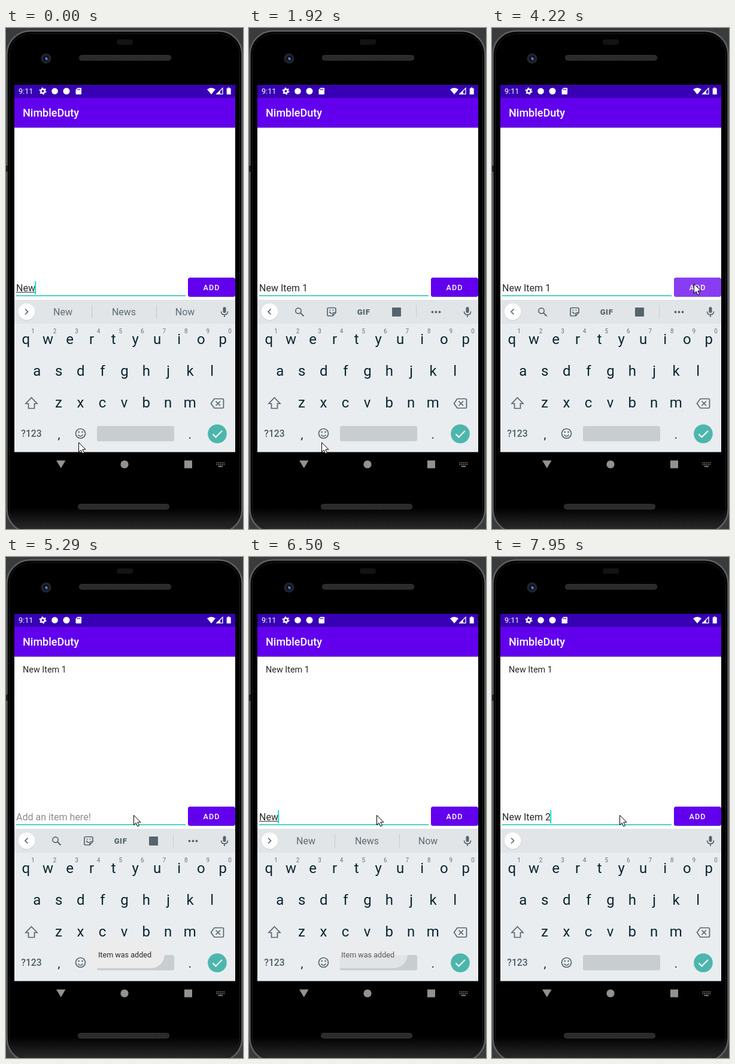
An HTML page for the animation above (8000 ms loop, 396 by 837 pixels).

```html
<!DOCTYPE html>
<html lang="en">
<head>
<meta charset="utf-8">
<title>Todo phone demo</title>
<style>
  html, body { margin: 0; width: 100%; height: 100%; overflow: hidden; background: #3a3b3d; }
  svg { display: block; font-family: Roboto, sans-serif; }
  text { white-space: pre; }
  .mid { text-anchor: middle; }
  .medium { font-weight: 500; }
  .line { fill: none; stroke: #56646c; stroke-width: 1.7; }
  .key { font-size: 24px; fill: #0b2530; }
  .digit { font-size: 10px; fill: #63727a; }
  .word { font-size: 16px; fill: #5d6b73; }
</style>
</head>
<body>
<svg width="396" height="837" viewBox="0 0 396 837">
  <defs>
    <pattern id="mesh" width="3" height="3" patternUnits="userSpaceOnUse">
      <rect width="3" height="3" fill="#202020"/>
      <path d="M0 3L3 0" stroke="#484848" stroke-width=".8"/>
    </pattern>
    <linearGradient id="body" x2="0" y2="1">
      <stop offset=".95"/><stop offset="1" stop-color="#303030"/>
    </linearGradient>
  </defs>

  <!-- phone body -->
  <rect width="396" height="837" fill="#3a3b3d"/>
  <rect x="1.500" y="5" width="393" height="838" rx="39" fill="url(#body)" stroke="#5e6061" stroke-width="2.500"/>
  <rect x="5.5" y="9.500" width="385" height="829" rx="35" fill="none" stroke="#1d1d1d"/>
  <path d="M0 230h3v10H0z" fill="#222"/>
  <rect x="185" y="19" width="27" height="9" rx="4" fill="#131313"/>
  <circle cx="67" cy="51" r="8.5" fill="#252529"/>
  <circle cx="67" cy="51" r="5.5" fill="#10152c"/>
  <circle cx="68" cy="52" r="2.3" fill="#365a9c"/>
  <circle cx="67" cy="50.500" r="1.200" fill="#9db4e0"/>
  <g fill="url(#mesh)" stroke="#343434">
    <rect x="122.5" y="45.500" width="153" height="8.500" rx="4"/>
    <rect x="120.5" y="795.5" width="152" height="8.500" rx="4"/>
  </g>

  <!-- status and title bars -->
  <rect x="14" y="95" width="369" height="21.300" fill="#3700b3"/>
  <rect x="14" y="116.300" width="369" height="50.200" fill="#6200ee"/>
  <g fill="#fff">
    <text x="21" y="110" font-size="12.6">9:11</text>
    <circle cx="61.5" cy="105.5" r="3.2" fill="none" stroke="#fff" stroke-width="2.5"/>
    <circle cx="61.5" cy="105.5" r="5.1" fill="none" stroke="#fff" stroke-width="1.8" stroke-dasharray="2.5 2.84"/>
    <circle cx="81.5" cy="105.5" r="5.3"/>
    <circle cx="101" cy="105.5" r="5.5"/>
    <path d="M119.500 100H125q1 0 1 1v9q0 1-1 1h-7.500q-1 0-1-1V103z"/>
    <path d="M119.500 101.500v2.500M121.500 101.500v2.500M123.500 101.500v2.500" stroke="#3700b3"/>
    <path d="M336 102.500q7-5 14 0L343 111z"/>
    <path d="M352 110.300L362 100.500V110.300z" fill="none" stroke="#fff" stroke-width="1.300"/>
    <path d="M351 111L358 104V111z"/>
    <path d="M370.500 99.500h3v1.200h2.200v10.300h-7V100.700h1.800z"/>
    <text class="medium" x="28" y="148" font-size="18">NimbleDuty</text>
  </g>

  <!-- app content -->
  <rect x="14" y="166.500" width="369" height="288" fill="#fff"/>
  <text id="item" x="28" y="193" font-size="14.4" fill="#282828">New Item 1</text>
  <text id="hint" x="17" y="440" font-size="16" fill="#8c8c8c">Add an item here!</text>
  <text id="field" x="17" y="440" font-size="16" fill="#282828"></text>
  <rect id="underline" y="441" height="1" fill="#333"/>
  <rect id="caret" y="423" width="1.8" height="22" fill="#03dac5"/>
  <rect x="17" y="446.500" width="283" height="1.600" fill="#1fc4b2"/>
  <rect x="304" y="418" width="79" height="32" rx="3.500" fill="#dedede"/>
  <rect id="button" x="304" y="417" width="79" height="32" rx="3.500"/>
  <text class="mid medium" x="343.500" y="438" font-size="12.600" letter-spacing="1.12" fill="#fff">ADD</text>

  <!-- keyboard -->
  <rect x="14" y="454" width="369" height="254.500" fill="#e9edf0"/>
  <rect x="14" y="454" width="369" height="40" fill="#e1e5e8"/>
  <circle cx="34.500" cy="475" r="14" fill="#cdd2d5"/>
  <circle cx="34.500" cy="474" r="13.700" fill="#fff"/>
  <path id="chevron" class="line"/>
  <g fill="#56646c">
    <rect x="362.500" y="466" width="5" height="10" rx="2.500"/>
    <path class="line" d="M359.500 473.500q0 5.500 5.500 5.500t5.500-5.500M365 479v4"/>
  </g>
  <g id="words">
    <path d="M143.500 463v22M251.500 463v22" stroke="#c3c9cc"/>
    <text class="word mid" x="95" y="480"></text>
    <text class="word mid" x="197" y="480"></text>
    <text class="word mid" x="299" y="480"></text>
  </g>
  <g id="tools" fill="#56646c">
    <circle class="line" cx="82.500" cy="472.500" r="4.600"/>
    <path class="line" d="M86 476l5.500 5.500" style="stroke-width:2"/>
    <path class="line" d="M133 467.500h10q2 0 2 2v6l-5 5.500h-7q-2 0-2-2v-9.500q0-2 2-2zM145 475.500h-3q-2 0-2 2v3.500M134.500 474q1 3 4 3"/>
    <circle cx="135.500" cy="471.500" r="1"/><circle cx="140.500" cy="471.500" r="1"/>
    <text class="mid" x="191.500" y="479" font-size="13" font-weight="900" letter-spacing=".6">GIF</text>
    <rect x="239" y="467" width="15" height="15" rx="1"/>
    <path d="M279.500 463v22" stroke="#c9ced1"/>
    <circle cx="306.500" cy="474.500" r="1.900"/><circle cx="312.500" cy="474.500" r="1.900"/><circle cx="318.500" cy="474.500" r="1.900"/>
  </g>
  <g id="keys"></g>
  <path id="shift" class="line" d="M42.500 617.500L52 627.500h-4.500v8h-10v-8H33z"/>
  <path class="line" d="M348 619.500h14q1.500 0 1.500 1.500v12.500q0 1.500-1.500 1.500h-14l-5.500-7.700zM350.500 623.500l7.500 7.500M358 623.500l-7.500 7.500"/>
  <text class="mid medium" x="42.500" y="683" font-size="15.700" fill="#4d5c64">?123</text>
  <text class="mid" x="88.500" y="686" font-size="20" fill="#0b2530">,</text>
  <text class="mid" x="307.500" y="686" font-size="20" fill="#0b2530">.</text>
  <circle class="line" cx="124.500" cy="677.500" r="8"/>
  <path class="line" d="M120.500 679.500q4 5 8 0"/>
  <g fill="#56646c"><circle cx="121.700" cy="675" r="1.300"/><circle cx="127.500" cy="675" r="1.300"/></g>
  <rect x="152" y="665" width="129" height="25.500" rx="3" fill="#c8cdd0"/>
  <circle cx="353" cy="678" r="15.800" fill="#4db6ac"/>
  <path d="M345.500 678.500l5 5L361 673" fill="none" stroke="#fff" stroke-width="2"/>

  <!-- navigation bar -->
  <g fill="#929292">
    <path d="M84 722.500h15.500l-7.700 13z"/>
    <circle cx="198" cy="729" r="6.600"/>
    <rect x="298" y="722.500" width="13" height="13"/>
    <path d="M351.500 726.500h14M351.500 729.500h14" stroke="#929292" stroke-width="1.700" stroke-dasharray="1.700 1.300"/>
    <path d="M354.500 732.500h7.500" stroke="#929292" stroke-width="1.700"/>
  </g>

  <g id="toast">
    <rect x="132" y="641" width="133" height="46" rx="23" fill="#ececec"/>
    <text class="mid" x="198.500" y="669" font-size="12.600" fill="#2b2b2b">Item was added</text>
  </g>
  <path id="pointer" d="M0 0V16L3.700 12.600L6.300 18.500L9 17.300L6.400 11.600H11.500Z" fill="#fff" stroke="#000"/>
</svg>
<script>
const DURATION = 8000;
const FIELD_X = 17;
const $ = id => document.getElementById(id);
const afterNew = "year|one|and";

// [start, field text, suggestions (or "tools"), shift held]
const typing = [
  [0, "New", "New|News|Now"],
  [120, "New ", afterNew],
  [430, "New ", afterNew, true],
  [560, "New I", "I|I'm|In"],
  [690, "New It", "It|Its|It's"],
  [820, "New Ite", "Ite|Items|Item"],
  [970, "New Item", "Item|Items|Item's"],
  [1120, "New Item ", "is|in|for"],
  [1290, "New Item 1", ""],
  [1460, "New Item 1", "tools"],
  [4470, "", "tools"],
  [5560, "", "tools", true],
  [5830, "N", "tools", true],
  [6110, "N", "N|No|New"],
  [6240, "Ne", "Ne|New|Need"],
  [6500, "New", "New|News|Now"],
  [6620, "New ", afterNew],
  [6880, "New ", afterNew, true],
  [7130, "New I", "I|I'm|In"],
  [7280, "New It", "It|Its|It's"],
  [7450, "New Ite", "Ite|Items|Item"],
  [7620, "New Item", "Item|Items|Item's"],
  [7780, "New Item ", "is|in|for"],
  [7950, "New Item 2", ""]
];
const caretOff = [[1920, 2480], [2850, 3280], [3800, 4470], [4880, 5560]];
const toastAlpha = [[0, 0], [4750, .4], [4880, .8], [5020, 1], [6500, .72], [6620, .3], [6750, 0]];
const moves = [
  { times: [3280, 3410, 3540, 3670, 3800, 3940], from: [121.5, 692.5], to: [337.5, 427.5] },
  { times: [4750, 4880, 5020, 5150, 5290], from: [337.5, 427.5], to: [213.5, 431.5] }
];

const latest = (list, t) => list.filter(entry => entry[0] <= t).pop();
const show = (id, visible) => $(id).setAttribute("visibility", visible ? "visible" : "hidden");

function addText(cls, x, y, label) {
  const node = document.createElementNS("http://www.w3.org/2000/svg", "text");
  node.setAttribute("class", cls + " mid");
  node.setAttribute("x", x);
  node.setAttribute("y", y);
  node.textContent = label;
  $("keys").append(node);
  return node;
}

const letters = [["qwertyuiop", 33.4, 528], ["asdfghjkl", 51.7, 581], ["zxcvbnm", 88, 634]]
  .flatMap(([row, x, y]) => [...row].map((letter, i) => ({ letter, node: addText("key", x + i * 36.55, y, letter) })));
[..."1234567890"].forEach((digit, i) => addText("digit", 45 + i * 36.55, 510, digit));
const words = [...$("words").querySelectorAll("text")];

function pointerAt(t) {
  const move = t < moves[1].times[0] ? moves[0] : moves[1];
  const p = move.times.filter(time => time <= t).length / move.times.length;
  const eased = p * p * (3 - 2 * p);
  return move.from.map((start, i) => start + (move.to[i] - start) * eased);
}

let lastState;
function drawTyping(state) {
  if (state === lastState) return;
  lastState = state;
  const [, text, strip, shift] = state;
  const field = $("field");
  field.textContent = text;
  const width = field.getComputedTextLength();
  const wordStart = text.search(/[A-Za-z]*$/);
  const plainWidth = wordStart ? field.getSubStringLength(0, wordStart) : 0;
  $("underline").setAttribute("x", FIELD_X + plainWidth);
  $("underline").setAttribute("width", width - plainWidth);
  $("caret").setAttribute("x", FIELD_X - .6 + width);
  show("hint", !text);

  const tools = strip === "tools";
  show("tools", tools);
  show("words", !tools && strip);
  if (!tools) words.forEach((node, i) => node.textContent = strip.split("|")[i] || "");
  $("chevron").setAttribute("d", tools ? "M36.5 469.5l-4.500 4.500l4.500 4.500" : "M32 469.5l4.500 4.500l-4.500 4.500");
  letters.forEach(({ letter, node }) => node.textContent = shift ? letter.toUpperCase() : letter);
  $("shift").style.fill = shift ? "#56646c" : "none";
}

function draw() {
  const t = performance.now() % DURATION;
  drawTyping(latest(typing, t));
  show("caret", !caretOff.some(([from, to]) => t >= from && t < to));
  show("item", t >= 4750);
  $("button").setAttribute("fill", t >= 4220 && t < 4750 ? "#883df2" : "#6200ee");
  $("toast").setAttribute("opacity", latest(toastAlpha, t)[1]);
  $("pointer").setAttribute("transform", `translate(${pointerAt(t)})`);
  requestAnimationFrame(draw);
}
draw();
</script>
</body>
</html>
```
